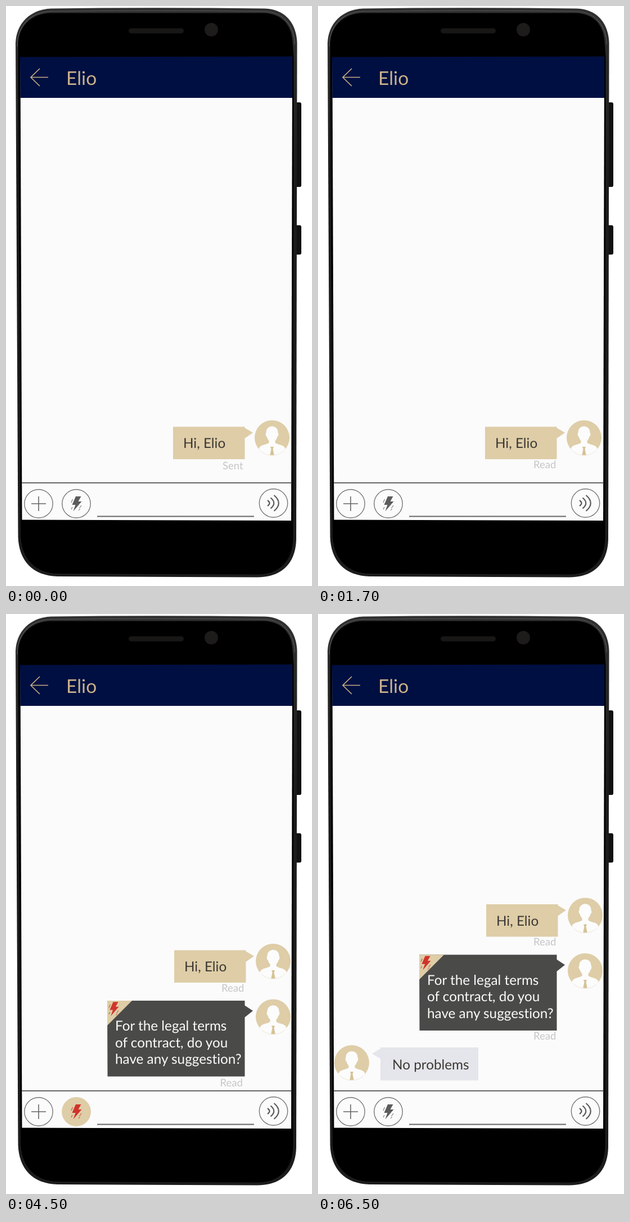
Animation, 544 px wide and 1029 px high, one loop 8000 ms. Source, as an HTML page:

```html
<!DOCTYPE html>
<html lang="en">
<head>
<meta charset="utf-8">
<title>Chat</title>
<style>
html, body { margin: 0; width: 100%; height: 100%; overflow: hidden; background: #fff; }
svg {
  display: block; width: 544px; height: 1029px;
  font-family: Lato, "Open Sans", sans-serif;
  font-variant-ligatures: none; text-rendering: geometricPrecision;
}
.ring { fill: none; stroke: #777; stroke-width: 1.4; }
.thin { fill: none; stroke: #666; stroke-width: 1.6; }
.wave { fill: none; stroke: #5a5a5a; stroke-width: 2.2; }
.msg { font-size: 24.3px; fill: #3c3834; }
.light { fill: #fafafa; }
.status { font-size: 18.5px; fill: #c6c6c8; }
</style>
</head>
<body>
<svg viewBox="0 0 544 1029">
  <defs>
    <linearGradient id="rim" x2="0" y2="1">
      <stop offset="0" stop-color="#303030"/>
      <stop offset=".08" stop-color="#2a2a2a"/>
      <stop offset=".3" stop-color="#1c1c1c"/>
      <stop offset="1" stop-color="#1c1c1c"/>
    </linearGradient>
    <clipPath id="disc"><circle r="31"/></clipPath>
    <g id="avatar">
      <circle r="31" fill="#decda7"/>
      <g clip-path="url(#disc)">
        <path fill="#fcfcfc" d="M-10.5-9C-11-24 11-24 10.5-9C12-8 11.5-3 9.5-2C8 2 7 4 5.5 5V9C11 13 20 12 23 18C25 22 26 27 26 32H-26C-26 27-25 22-23 18C-20 12-11 13-5.5 9V5C-7 4-8 2-9.5-2C-11.5-3-12-8-10.5-9Z"/>
        <path fill="#d6c296" d="M-3 16H3L1.5 20L4 32H-4L-1.5 20Z"/>
      </g>
      <path d="M-20 24A31 31 0 0 0 20 24" fill="none" stroke="#ece5d6" stroke-width=".8"/>
    </g>
    <g id="bolt">
      <path d="M-1-13H8.5L3.5-4H9.5L-5.5 13.5L-1.5 2H-7.5Z"/>
      <path d="M-6.5-8L-9-2M9 3L5.500 8M-7 6L-9 10M6.500 9L4 12" fill="none" stroke="currentColor" stroke-width="1"/>
    </g>
  </defs>

  <rect x="514" y="171" width="11" height="150" rx="3" fill="#111"/>
  <rect x="514" y="389" width="11" height="52" rx="3" fill="#111"/>
  <path fill="url(#rim)" d="M80 4.500Q270 2 460 4.500C497 6 516.500 31 517.500 66L516 946C515 988 491 1013 447 1013.500L92 1012C48 1011 23 985 21.500 942L17 66C18 31 43 6 80 4.500Z"/>
  <path fill="none" stroke="#555" stroke-width="1.200" d="M20 72C20 35 43 11 80 9.500Q270 7 460 9.500C493 11 512 34 513.500 68"/>
  <path d="M80 12.500H459C491 14 508 34 509.500 64L511.500 90L510.500 944C509 984 488 1008 447 1008.500L92 1007C51 1006 29 981 26 942L21.500 90V66C23 36 45 13 80 12.500Z"/>
  <rect x="218" y="39.500" width="98" height="9" rx="4.500" fill="#191616"/>
  <circle cx="365" cy="42" r="12" fill="#1e1b1b"/>

  <path fill="#fbfbfb" d="M25.500 91H509L507 913L28.500 911.500Z"/>
  <path fill="#000f42" d="M25 90.500L509 89.500V163H25.500Z"/>
  <path d="M75 126.500H44M60 111L44 126.500L60 142" fill="none" stroke="#c5ad7e" stroke-width="1.700"/>
  <text x="107" y="139.500" font-size="33.500" fill="#c9b38a">Elio</text>

  <g id="chat">
    <g id="hello">
      <path fill="#decda7" d="M299 596.500H426.500V598.500L441 607L426.500 617V654H299Z"/>
      <text class="msg" x="317" y="634">Hi, Elio</text>
      <use href="#avatar" x="475" y="616"/>
    </g>
    <text id="mark1" class="status"></text>
    <g id="ask">
      <path fill="#4a4a48" d="M180 686H424.500V694.500L439 704L424.500 715.500V820.500H180.500Z"/>
      <path fill="#decda7" d="M180 686H224L180 730Z"/>
      <use href="#bolt" transform="translate(191.500 700.500) scale(.95)" fill="#d0342a" color="#d0342a"/>
      <text class="msg light" x="194" y="739">For the legal terms</text>
      <text class="msg light" x="194" y="768.500">of contract, do you</text>
      <text class="msg light" x="194" y="798">have any suggestion?</text>
      <use href="#avatar" x="475" y="714.500"/>
    </g>
    <text id="mark2" class="status"></text>
  </g>
  <g id="reply">
    <path fill="#e5e6eb" d="M111 769H285V827.500H111V789L96 780L111 771Z"/>
    <text class="msg" x="132" y="807.500">No problems</text>
    <use href="#avatar" x="60" y="796"/>
  </g>

  <path d="M28 846H507M162 905.500H441" stroke="#666" stroke-width="2"/>
  <circle class="ring" cx="58" cy="883" r="25.200"/>
  <path class="thin" d="M45 883H71M58 870V896"/>
  <circle id="flashDisc" class="ring" cx="125" cy="883" r="25.200"/>
  <use id="flash" href="#bolt" transform="translate(125 883)"/>
  <circle class="ring" cx="475.500" cy="882" r="25.200"/>
  <path class="wave" d="M465 877Q472 882 465 887M470.500 872.500Q482 882 470.500 891.500M476.500 868Q493 882 476.500 896"/>
</svg>
<script>
const LOOP = 8000;
// Labels are [text, x, baseline] on the stage.
const STEPS = [
  { at: 0,    dx: -2, dy: 150, first: ["Sent", 385, 822] },
  { at: 500,  dx: -2, dy: 150, first: ["Read", 383, 820] },
  { at: 2500, dx: 0,  dy: 0,   first: ["Read", 383, 670], second: ["Sent", 387.5, 838], hot: true },
  { at: 4500, dx: 0,  dy: 0,   first: ["Read", 383, 670], second: ["Read", 380.5, 838], hot: true },
  { at: 6500, dx: 0,  dy: -81.5, first: ["Read", 383, 588], second: ["Read", 383, 755], reply: true }
];
const el = id => document.getElementById(id);
const show = (id, on) => el(id).style.display = on ? "" : "none";

function label(id, value, step) {
  show(id, value);
  if (!value) return;
  const [text, x, y] = value;
  el(id).textContent = text;
  el(id).setAttribute("x", x - step.dx);
  el(id).setAttribute("y", y - step.dy);
}

function render(step) {
  el("chat").setAttribute("transform", `translate(${step.dx} ${step.dy})`);
  label("mark1", step.first, step);
  label("mark2", step.second, step);
  show("ask", step.second);
  show("reply", step.reply);
  const ink = step.hot ? "#d0342a" : "#5c5c5c";
  el("flash").style.fill = el("flash").style.color = ink;
  el("flashDisc").style.fill = step.hot ? "#decda7" : "none";
  el("flashDisc").style.stroke = step.hot ? "#decda7" : "#777";
}

let current;
function tick() {
  const t = performance.now() % LOOP;
  const step = STEPS.findLast(s => s.at <= t);
  if (step !== current) render(current = step);
  requestAnimationFrame(tick);
}
tick();
</script>
</body>
</html>
```
